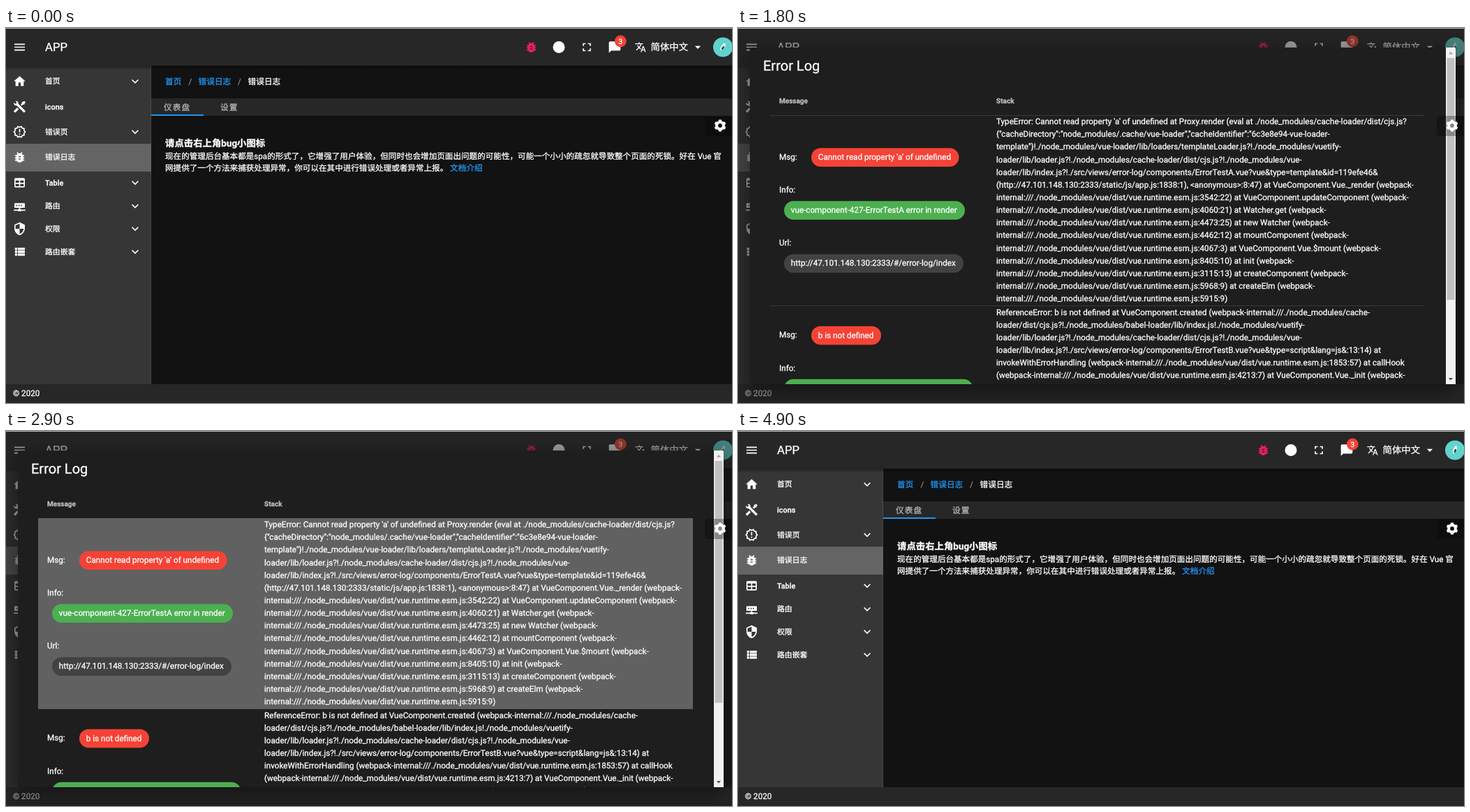
An HTML page for the animation above (5 s loop, 1040 px wide and 538 px high).

```html
<!DOCTYPE html>
<html lang="zh-CN">
<head>
<meta charset="utf-8">
<title>Error Log</title>
<style>
html, body { margin: 0; width: 100%; height: 100%; overflow: hidden; background: #121212; }
svg { display: block; width: 1040px; height: 538px; }
text {
  font-family: Roboto, "Noto Sans CJK SC", "Noto Sans CJK", sans-serif;
  white-space: pre; text-rendering: geometricPrecision; stroke-width: .3px;
}
#panel { filter: drop-shadow(0 9px 14px rgba(0, 0, 0, .45)); }
</style>
</head>
<body>
<svg id="stage" viewBox="0 0 1040 538" xmlns="http://www.w3.org/2000/svg">
  <defs>
    <linearGradient id="shade" x1="0" y1="0" x2="0" y2="1">
      <stop offset="0" stop-color="#000" stop-opacity=".4"/>
      <stop offset="1" stop-color="#000" stop-opacity="0"/>
    </linearGradient>
    <clipPath id="view"><rect x="17" y="28" width="997" height="483"/></clipPath>
  </defs>
  <g id="page"></g>
  <rect id="scrim" width="1040" height="538" fill="#212121"/>
  <g id="dialog">
    <rect id="panel" x="17" y="28" width="1011" height="483" rx="3" fill="#1e1e1e"/>
    <g clip-path="url(#view)"><g id="content"></g></g>
    <g id="bar"></g>
  </g>
  <g id="top"></g>
</svg>
<script>
const NS = "http://www.w3.org/2000/svg";
const $ = id => document.getElementById(id);
const page = $("page"), content = $("content"), bar = $("bar"), topLayer = $("top");
const BLUE = "#2196f3", RED = "#f44336", GREEN = "#4caf50", GREY = "#424242";
const BODY = 11.7;

function add(parent, tag, attrs, label) {
  const el = document.createElementNS(NS, tag);
  for (const k in attrs) el.setAttribute(k, attrs[k]);
  if (label) el.textContent = label;
  parent.appendChild(el);
  return el;
}

function box(parent, x, y, width, height, fill, more) {
  return add(parent, "rect", { x, y, width, height, fill, ...more });
}

// yc is the vertical centre of the line; a thin outline gives the heavier strokes
function write(parent, label, x, yc, size = BODY, { fill = "#fff", ...more } = {}) {
  return add(parent, "text", { x, y: yc + size * .35, "font-size": size, fill, stroke: fill, ...more }, label);
}

const ICONS = {
  menu: "M3 6H21V8H3ZM3 11H21V13H3ZM3 16H21V18H3Z",
  home: "M10 20V14H14V20H19V12H22L12 3L2 12H5V20Z",
  tools: "M21.71 20.29L20.29 21.71A1 1 0 0 1 18.88 21.71L7 9.85A3.81 3.81 0 0 1 6 10A4 4 0 0 1 2.22 4.7L4.76 7.24L7.24 4.76L4.7 2.22A4 4 0 0 1 10 6A3.81 3.81 0 0 1 9.85 7L21.71 18.88A1 1 0 0 1 21.71 20.29M2.29 18.88A1 1 0 0 0 2.29 20.29L3.71 21.71A1 1 0 0 0 5.12 21.71L10.59 16.25L7.76 13.42M20 2L16 4V6L13.83 8.17L15.83 10.17L18 8H20L22 4Z",
  alert: "M23 12L20.56 14.78L20.9 18.46L17.29 19.28L15.4 22.46L12 21L8.6 22.47L6.71 19.29L3.1 18.47L3.44 14.78L1 12L3.44 9.21L3.1 5.53L6.71 4.72L8.6 1.54L12 3L15.4 1.54L17.29 4.72L20.9 5.54L20.56 9.22ZM20.33 12L18.5 9.89L18.74 7.1L16 6.5L14.58 4.07L12 5.18L9.42 4.07L8 6.5L5.26 7.09L5.5 9.88L3.67 12L5.5 14.1L5.26 16.9L8 17.5L9.42 19.93L12 18.81L14.58 19.92L16 17.5L18.74 16.89L18.5 14.1ZM11 15H13V17H11ZM11 7H13V13H11Z",
  bug: "M14 12H10V10H14ZM14 16H10V14H14ZM20 8H17.19C16.74 7.22 16.12 6.55 15.37 6.04L17 4.41L15.59 3L13.42 5.17C12.5 4.95 11.5 4.95 10.59 5.17L8.41 3L7 4.41L8.62 6.04C7.88 6.55 7.26 7.22 6.81 8H4V10H6.09C6.04 10.33 6 10.66 6 11V12H4V14H6V15C6 15.34 6.04 15.67 6.09 16H4V18H6.81C7.85 19.79 9.78 21 12 21C14.22 21 16.15 19.79 17.19 18H20V16H17.91C17.96 15.67 18 15.34 18 15V14H20V12H18V11C18 10.66 17.96 10.33 17.91 10H20Z",
  table: "M5 4H19A2 2 0 0 1 21 6V18A2 2 0 0 1 19 20H5A2 2 0 0 1 3 18V6A2 2 0 0 1 5 4M5 8V12H11V8ZM13 8V12H19V8ZM5 14V18H11V14ZM13 14V18H19V14Z",
  router: "M4 7H20A1 1 0 0 1 21 8V14A1 1 0 0 1 20 15H13V17H14A1 1 0 0 1 15 18H22V20H15A1 1 0 0 1 14 21H10A1 1 0 0 1 9 20H2V18H9A1 1 0 0 1 10 17H11V15H4A1 1 0 0 1 3 14V8A1 1 0 0 1 4 7M6 10V12H8V10ZM10 10V12H12V10ZM14 10V12H16V10Z",
  shield: "M12 1L3 5V11C3 16.55 6.84 21.74 12 23C17.16 21.74 21 16.55 21 11V5ZM12 12H19C18.47 16.11 15.72 19.78 12 20.93V12H5V6.3L12 3.19Z",
  list: "M9 5V9H21V5ZM9 19H21V15H9ZM9 14H21V10H9ZM4 9H8V5H4ZM4 19H8V15H4ZM4 14H8V10H4Z",
  down: "M7.41 8.58L12 13.17L16.59 8.58L18 10L12 16L6 10Z",
  full: "M5 5H10V7H7V10H5ZM14 5H19V10H17V7H14ZM17 14H19V19H14V17H17ZM10 17V19H5V14H7V17Z",
  message: "M20 2H4A2 2 0 0 0 2 4V22L6 18H20A2 2 0 0 0 22 16V4A2 2 0 0 0 20 2Z",
  translate: "M12.87 15.07L10.33 12.56C12.1 10.59 13.34 8.36 14.07 6H17V4H10V2H8V4H1V6H12.17C11.5 7.92 10.44 9.75 9 11.35C8.07 10.32 7.3 9.19 6.69 8H4.69C5.42 9.63 6.42 11.17 7.67 12.56L2.58 17.58L4 19L9 14L12.11 17.11ZM18.5 10H16.5L12 22H14L15.12 19H19.87L21 22H23ZM15.88 17L17.5 12.67L19.12 17Z",
  caret: "M7 10L12 15L17 10Z"
};

function icon(name, cx, cy, size = 20, fill = "#fff") {
  const k = size / 24;
  return add(page, "path", {
    d: ICONS[name], fill, "fill-rule": "evenodd",
    transform: `translate(${cx - size / 2} ${cy - size / 2}) scale(${k})`
  });
}

// Page body
box(page, 0, 0, 1040, 538, "#121212");
box(page, 208, 101, 832, 25, "#272727");
write(page, "仪表盘", 226, 114, BODY, { "letter-spacing": "1.04", fill: "#b4b4b4" });
write(page, "设置", 307, 114, BODY, { "letter-spacing": "1.04", fill: "#b4b4b4" });
box(page, 208, 124, 75, 2, BLUE);
write(page, "首页", 228, 77, BODY, { fill: BLUE });
write(page, "错误日志", 275.5, 77, BODY, { fill: BLUE });
write(page, "错误日志", 346.5, 77);
for (const x of [261.5, 332]) write(page, "/", x, 77, BODY, { fill: "#888" });
write(page, "请点击右上角bug小图标", 228, 165.5, 13.4, { "font-weight": 700 });
write(page, "现在的管理后台基本都是spa的形式了，它增强了用户体验，但同时也会增加页面出问题的可能性，可能一个小小的疏忽就导致整个页面的死锁。好在 Vue 官", 228, 184, 11.58);
write(page, "网提供了一个方法来捕获处理异常，你可以在其中进行错误处理或者异常上报。", 228, 201, 11.58);
write(page, "文档介绍", 636, 201, BODY, { fill: BLUE });

// Sidebar
box(page, 0, 54, 208, 457, "#363636");
box(page, 207, 54, 1, 457, "#4a4a4a");
box(page, 0, 166, 208, 40, "#646464");
[
  ["home", "首页", 76.5, true], ["tools", "icons", 113, false],
  ["alert", "错误页", 149, true], ["bug", "错误日志", 185.5, false],
  ["table", "Table", 222, true], ["router", "路由", 255.5, true],
  ["shield", "权限", 288, true], ["list", "路由嵌套", 321, true]
].forEach(([name, label, y, opens]) => {
  icon(name, 19.5, y);
  write(page, label, 56, y, 10.87, { "font-weight": 500 });
  if (opens) icon("down", 185, y);
});

// Header and footer
box(page, 0, 0, 1040, 54, "#272727");
box(page, 0, 54, 1040, 6, "url(#shade)");
box(page, 0, 511, 1040, 27, "#272727");
write(page, "© 2020", 10, 524);
icon("menu", 19.5, 27.5);
write(page, "APP", 56, 27.5, 16.7);
const halo = add(page, "circle", { cx: 752.5, cy: 27.5, fill: "#e91e63" });
icon("bug", 752.5, 27.5, 20, "#e91e63");
add(page, "circle", { cx: 792, cy: 27.5, r: 8.5, fill: "#fff" });
icon("full", 832, 27.5);
icon("message", 872, 27.5);
add(page, "circle", { cx: 880.3, cy: 19, r: 8.4, fill: RED });
write(page, "3", 880.3, 19, 10.5, { "text-anchor": "middle" });
icon("translate", 909, 27.5, 16.7);
write(page, "简体中文", 923.5, 27.5, 13.4);
icon("caret", 991, 27.5);
add(page, "circle", { cx: 1027, cy: 27.5, r: 14, fill: "#60d3cd" });
const figure = add(page, "g", {});
add(figure, "ellipse", { cx: 0, cy: 0, rx: 2.6, ry: 6, fill: "#eef4f2" });
add(figure, "ellipse", { cx: .8, cy: 1.5, rx: 1.4, ry: 3, fill: "#24474a" });

// Dialog content
const STACK_A = `TypeError: Cannot read property 'a' of undefined at Proxy.render (eval at ./node_modules/cache-loader/dist/cjs.js?
{"cacheDirectory":"node_modules/.cache/vue-loader","cacheIdentifier":"6c3e8e94-vue-loader-
template"}!./node_modules/vue-loader/lib/loaders/templateLoader.js?!./node_modules/vuetify-
loader/lib/loader.js?!./node_modules/cache-loader/dist/cjs.js?!./node_modules/vue-
loader/lib/index.js?!./src/views/error-log/components/ErrorTestA.vue?vue&type=template&id=119efe46&
(http://47.101.148.130:2333/static/js/app.js:1838:1), <anonymous>:8:47) at VueComponent.Vue._render (webpack-
internal:///./node_modules/vue/dist/vue.runtime.esm.js:3542:22) at VueComponent.updateComponent (webpack-
internal:///./node_modules/vue/dist/vue.runtime.esm.js:4060:21) at Watcher.get (webpack-
internal:///./node_modules/vue/dist/vue.runtime.esm.js:4473:25) at new Watcher (webpack-
internal:///./node_modules/vue/dist/vue.runtime.esm.js:4462:12) at mountComponent (webpack-
internal:///./node_modules/vue/dist/vue.runtime.esm.js:4067:3) at VueComponent.Vue.$mount (webpack-
internal:///./node_modules/vue/dist/vue.runtime.esm.js:8405:10) at init (webpack-
internal:///./node_modules/vue/dist/vue.runtime.esm.js:3115:13) at createComponent (webpack-
internal:///./node_modules/vue/dist/vue.runtime.esm.js:5968:9) at createElm (webpack-
internal:///./node_modules/vue/dist/vue.runtime.esm.js:5915:9)`;
const STACK_B = `ReferenceError: b is not defined at VueComponent.created (webpack-internal:///./node_modules/cache-
loader/dist/cjs.js?!./node_modules/babel-loader/lib/index.js!./node_modules/vuetify-
loader/lib/loader.js?!./node_modules/cache-loader/dist/cjs.js?!./node_modules/vue-
loader/lib/index.js?!./src/views/error-log/components/ErrorTestB.vue?vue&type=script&lang=js&:13:14) at
invokeWithErrorHandling (webpack-internal:///./node_modules/vue/dist/vue.runtime.esm.js:1853:57) at callHook
(webpack-internal:///./node_modules/vue/dist/vue.runtime.esm.js:4213:7) at VueComponent.Vue._init (webpack-
internal:///./node_modules/vue/dist/vue.runtime.esm.js:4998:5) at new VueComponent (webpack-
internal:///./node_modules/vue/dist/vue.runtime.esm.js:5144:12) at createComponentInstanceForVnode
(webpack-internal:///./node_modules/vue/dist/vue.runtime.esm.js:3280:10) at init (webpack-
internal:///./node_modules/vue/dist/vue.runtime.esm.js:3111:45) at createComponent (webpack-
internal:///./node_modules/vue/dist/vue.runtime.esm.js:5968:9) at createElm (webpack-
internal:///./node_modules/vue/dist/vue.runtime.esm.js:5915:9) at createChildren (webpack-
internal:///./node_modules/vue/dist/vue.runtime.esm.js:6043:9)`;
const URL_TEXT = "http://47.101.148.130:2333/#/error-log/index";

function chip(label, x, y, width, fill) {
  box(content, x, y, width, 26.7, fill, { rx: 13.35 });
  write(content, label, x + 9.8, y + 13);
}

function entry(dy, msg, msgWidth, info, infoWidth, stack, stackY) {
  write(content, "Msg:", 59, 184.7 + dy);
  chip(msg, 105, 172.2 + dy, msgWidth, RED);
  write(content, "Info:", 59, 232.3 + dy);
  chip(info, 66, 248.3 + dy, infoWidth, GREEN);
  write(content, "Url:", 59, 308.3 + dy);
  chip(URL_TEXT, 66, 324.4 + dy, 257, GREY);
  stack.split("\n").forEach((line, i) => write(content, line, 370, stackY + i * 18.15));
}

write(content, "Error Log", 36, 54.3, 20);
for (const [label, x] of [["Message", 59], ["Stack", 370]])
  write(content, label, x, 104.5, 10.03, { "font-weight": 700, fill: "#bcbcbc" });
for (const y of [125, 398]) box(content, 46, y, 938, 1, "#393939");
const hoverRow = box(content, 46, 125, 938, 274, "#616161");
entry(0, "Cannot read property 'a' of undefined", 211.5, "vue-component-427-ErrorTestA error in render", 259, STACK_A, 134);
entry(255.5, "b is not defined", 100, "vue-component-428-ErrorB error in created hook", 270.5, STACK_B, 407.5);

// Scrollbar
box(bar, 1014, 28, 14, 483, "#f1f1f1");
const thumb = box(bar, 1015.5, 43, 11, 347, "#c1c1c1");
const arrowUp = add(bar, "path", { d: "M1018 37.5L1021 34L1024 37.5Z" });
const arrowDown = add(bar, "path", { d: "M1018 502L1021 505.5L1024 502Z" });

// Settings tab, always in front
box(topLayer, 1001, 126, 44, 29, "#000", { rx: 4, opacity: .3 });
const gear = add(topLayer, "g", { transform: "translate(1023 140)" });
add(gear, "circle", { r: 4.9, fill: "none", stroke: "#fff", "stroke-width": 4 });
for (let i = 0; i < 6; i++)
  add(gear, "path", { d: "M-2.6 -5L-1.8 -8.5H1.8L2.6 -5Z", fill: "#fff", transform: `rotate(${i * 60})` });
box(topLayer, 0, 0, 1040, 1, "#b8b8b8");

// Motion
const LOOP = 5000, STEP = 100, MAX_SCROLL = 150.3;
const span = (t, from, to) => Math.min(1, Math.max(0, (t - from) / (to - from)));
const smooth = x => x * x * (3 - 2 * x);

// cubic-bezier(.25, .8, .25, 1)
function ease(x) {
  const at = (u, a, b) => 3 * (1 - u) ** 2 * u * a + 3 * (1 - u) * u * u * b + u ** 3;
  let lo = 0, hi = 1;
  for (let i = 0; i < 24; i++) {
    const mid = (lo + hi) / 2;
    if (at(mid, .25, .25) < x) lo = mid; else hi = mid;
  }
  return at(lo, .8, 1);
}

function draw(t) {
  const open = ease(span(t, 752, 1052)) - ease(span(t, 3667, 3967));
  const scroll = MAX_SCROLL * (smooth(span(t, 2035, 2285)) - smooth(span(t, 2700, 2880)));

  $("scrim").setAttribute("opacity", .46 * open);
  $("dialog").setAttribute("opacity", open);
  $("dialog").setAttribute("display", open > .001 ? "inline" : "none");
  $("dialog").setAttribute("transform",
    `translate(522.5 269.5) scale(${.5 + open / 2}) translate(-522.5 -269.5)`);

  content.setAttribute("transform", `translate(0 ${-scroll})`);
  thumb.setAttribute("y", 43 + 107 * scroll / MAX_SCROLL);
  arrowUp.setAttribute("fill", scroll > .5 ? "#505050" : "#a3a3a3");
  arrowDown.setAttribute("fill", scroll < MAX_SCROLL - .5 ? "#505050" : "#a3a3a3");
  hoverRow.setAttribute("opacity", t >= 2000 && t < 3400 ? 1 : 0);

  const hover = t >= 400 ? .08 : 0, press = t >= 700 ? .24 : 0;
  halo.setAttribute("r", press ? 19.5 : 18);
  halo.setAttribute("opacity", (hover + press) * (1 - span(t, 1050, 1250)));

  const tilt = 14 + 16 * Math.cos(t / 500 * Math.PI * 2);
  figure.setAttribute("transform", `translate(1027 27) rotate(${tilt})`);
}

function tick(now) {
  draw(Math.floor(now % LOOP / STEP) * STEP);
  requestAnimationFrame(tick);
}
draw(0);
requestAnimationFrame(tick);
</script>
</body>
</html>
```
